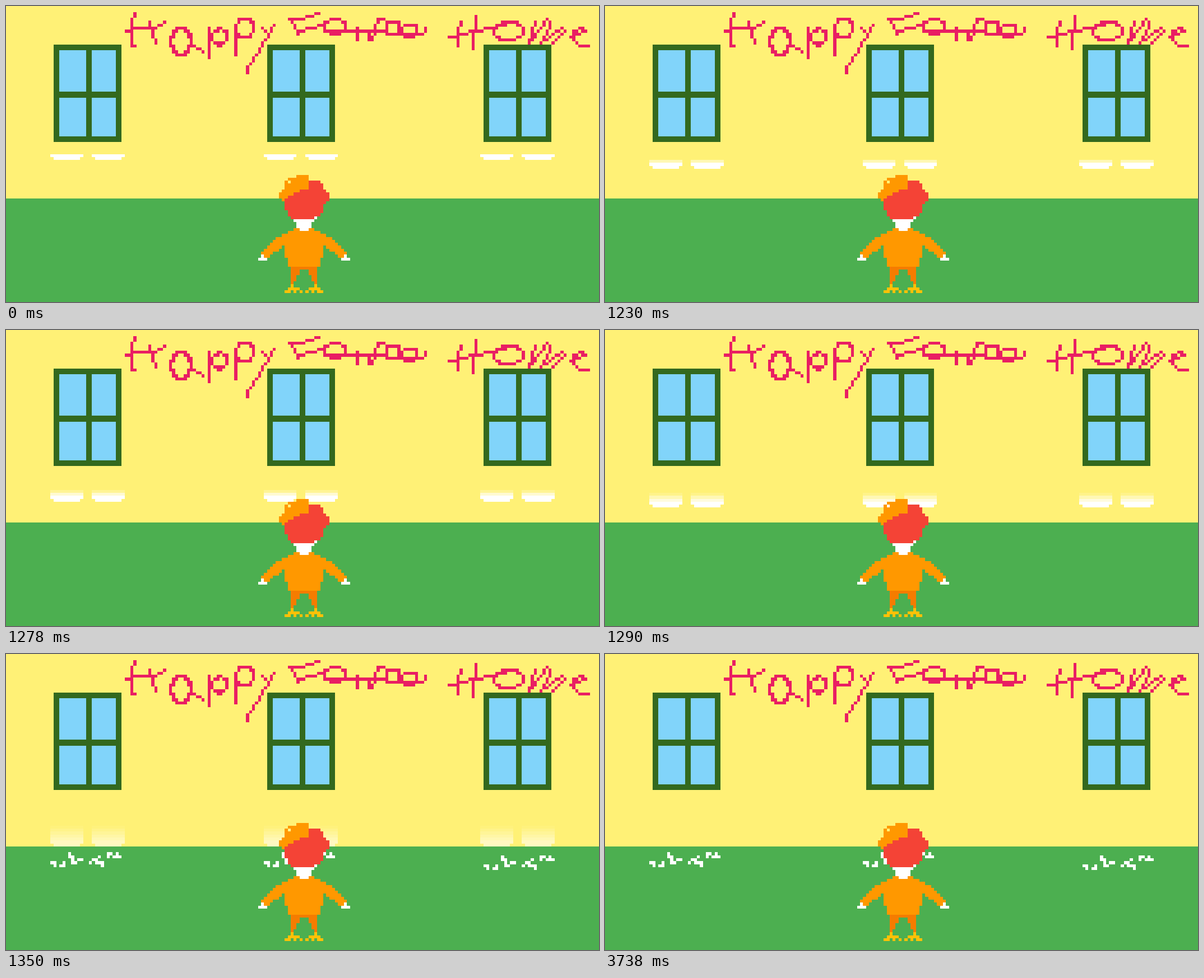
An HTML page with a canvas for the animation above (5310 ms loop, 1058x529 px).

```html
<!DOCTYPE html>
<html lang="en">
<head>
<meta charset="utf-8">
<title>Happy home</title>
<style>
  html, body { margin: 0; width: 100%; height: 100%; overflow: hidden; }
  canvas { display: block; width: 1058px; height: 529px; image-rendering: pixelated; }
</style>
</head>
<body>
<canvas id="stage" width="200" height="100"></canvas>
<script>
const LOOP = 5310, FALL_START = 1230, STEP = 30, LANDED = 5;
const WHITE = '#fff', PINK = '#e91e63', ORANGE = '#ff9800';
const MIRROR = 201; // x and MIRROR - x are the two sides of the person

const stage = document.getElementById('stage').getContext('2d');
let ctx = stage;

function rect(color, x, y, w = 1, h = 1) {
  ctx.fillStyle = color;
  ctx.fillRect(x, y, w, h);
}

const parse = text => text.split(' ').map(pair => pair.split(',').map(Number));

// One-cell-wide line through "x,y" points.
function stroke(color, text, mirrored = false) {
  const points = parse(text);
  points.slice(1).forEach(([x1, y1], i) => {
    const [x0, y0] = points[i];
    const n = Math.max(Math.abs(x1 - x0), Math.abs(y1 - y0));
    for (let k = 0; k <= n; k++) {
      const x = Math.round(x0 + (x1 - x0) * k / n);
      const y = Math.round(y0 + (y1 - y0) * k / n);
      rect(color, x, y);
      if (mirrored) rect(color, MIRROR - 1 - x, y);
    }
  });
}

function ring(color, cx, cy, rx, ry) {
  for (let a = 0; a < 2 * Math.PI; a += 0.15) {
    rect(color, Math.round(cx + rx * Math.cos(a)), Math.round(cy + ry * Math.sin(a)));
  }
}

// Fills every cell whose centre lies inside the outline.
function shape(color, text, mirrored = false) {
  const points = parse(text);
  if (mirrored) points.push(...points.map(([x, y]) => [MIRROR - x, y]).reverse());
  const path = new Path2D('M' + points.join('L') + 'Z');
  for (let y = 50; y < 100; y++) {
    for (let x = 80; x < 120; x++) {
      if (ctx.isPointInPath(path, x + 0.5, y + 0.5)) rect(color, x, y);
    }
  }
}

function layer(paint) {
  const canvas = document.createElement('canvas');
  canvas.width = 200;
  canvas.height = 100;
  ctx = canvas.getContext('2d');
  paint();
  ctx = stage;
  return canvas;
}

function paintWriting() {
  const pen = (...lines) => lines.forEach(line => stroke(PINK, line));
  const loop = (...oval) => ring(PINK, ...oval);

  pen('43,2 42,4 42,13 43,13', '40,8 45,7 50,7 53,5', '48,5 50,12');
  loop(58.5, 11.5, 3.2, 4.5);
  pen('62,9 62,12 66,15', '68,7 68,17');
  loop(71.5, 10, 2.7, 2.6);
  pen('77,7 77,16');
  loop(80, 7, 3, 3.3);
  pen('86,7 88,9', '90,6 84,16 81,20 81,22');

  pen('95,4 99,4 105,2', '96,5 98,9', '98,8 106,6');
  loop(110.5, 6.5, 3.4, 2.5);
  pen('107,8 118,8 140,9 141,7', '118,7 118,11', '122,8 122,11', '123,11 125,4 127,4');
  loop(130, 7, 2.5, 2.4);
  loop(135.5, 8, 2.7, 2.5);

  pen('153,5 152,8 152,13', '158,3 157,14', '149,10 158,8 168,6');
  loop(169, 8, 5, 3);
  pen('176,12 178,5', '177,11 182,4 183,6 180,12 187,7 188,8 184,12');
  pen('190,10 195,8 194,7 191,8 191,11 193,13 196,13');
}

const house = layer(() => {
  rect('#fff176', 0, 0, 200, 65);
  rect('#4caf50', 0, 65, 200, 35);
  paintWriting();
  for (const x of [16, 88, 161]) {
    rect('#33691e', x, 13, 23, 33);
    rect('#81d4fa', x + 2, 15, 19, 29);
    rect('#33691e', x + 11, 15, 2, 29);
    rect('#33691e', x + 2, 29, 19, 2);
  }
});

const person = layer(() => {
  shape('#f57c00', '96,88 96,94 97,94 97.1,93.3 99,90 99,89', true);
  stroke('#ffc107', '96,94 96,95 95,95 98,95', true);
  stroke('#ffc107', '94,96 95,96', true);
  for (let x = 97; x <= 103; x += 2) rect('#ffc107', x, 96);

  shape(ORANGE, '97,75 97,76 95.4,76 91,78.5 86,83.5 87,85 88.6,85 93.8,80.8 94,85 95,85 95,88', true);
  stroke(WHITE, '86,84 86,85 85,85 87,85', true);

  shape(WHITE, '95.8,71 97.8,73 97.8,75 98.8,75 98.8,76', true);
  shape(ORANGE, '99,57 101,57 102,58 102,62 94,66 93,66 92,64.8 92,63 95,61 97,59');
  stroke(ORANGE, '96,58 95,58 94,59 94,60 95,60');
  shape('#f44336', '102,59 106,59 108.9,64.2 108.9,66 107.2,67 107,70 103.5,72 97.2,72 95,70.8 94,68 94,65 102,61.3');
});

const shards = layer(() => {
  for (const line of ['15,0 16,0 16,1', '18,1 19,1 19,0', '21,-3 21,-2 22,-2 22,-1', '22,0 23,0', '24,-1 25,-1',
    '28,0 31,-2', '29,-1 31,0 32,0 32,1', '34,-2 34,-3 35,-3', '36,-2 38,-2 37,-3']) {
    for (const [dx, dy] of [[0, 70], [72, 70], [146, 71]]) {
      stroke(WHITE, parse(line).map(([x, y]) => [x + dx, y + dy]).join(' '));
    }
  }
});

// Window sills drop at a steady speed, with a tail one row longer each step.
function drawSills(step) {
  const top = step ? Math.round(50.8 + 2.4 * step) : 50;
  ctx.globalAlpha = step < LANDED ? 1 : 0.55;
  for (const left of [15, 87, 160]) {
    for (const x of [left, left + 14]) {
      for (let i = 1; i <= step; i++) {
        rect(`rgba(255,255,255,${0.9 * (i - 0.5) / step})`, x, top - step + i - 1, 11);
      }
      rect(WHITE, x, top, 11);
      rect(WHITE, x + 1, top + 1, 9);
    }
  }
  ctx.globalAlpha = 1;
}

function draw(time) {
  const t = time % LOOP;
  const step = Math.max(0, 1 + Math.floor((t - FALL_START) / STEP));
  ctx.drawImage(house, 0, 0);
  if (step <= LANDED) drawSills(step);
  if (step >= LANDED) ctx.drawImage(shards, 0, 0);
  ctx.drawImage(person, 0, 0);
}

const start = performance.now();
function tick() {
  draw(performance.now() - start);
  requestAnimationFrame(tick);
}
tick();
</script>
</body>
</html>
```
